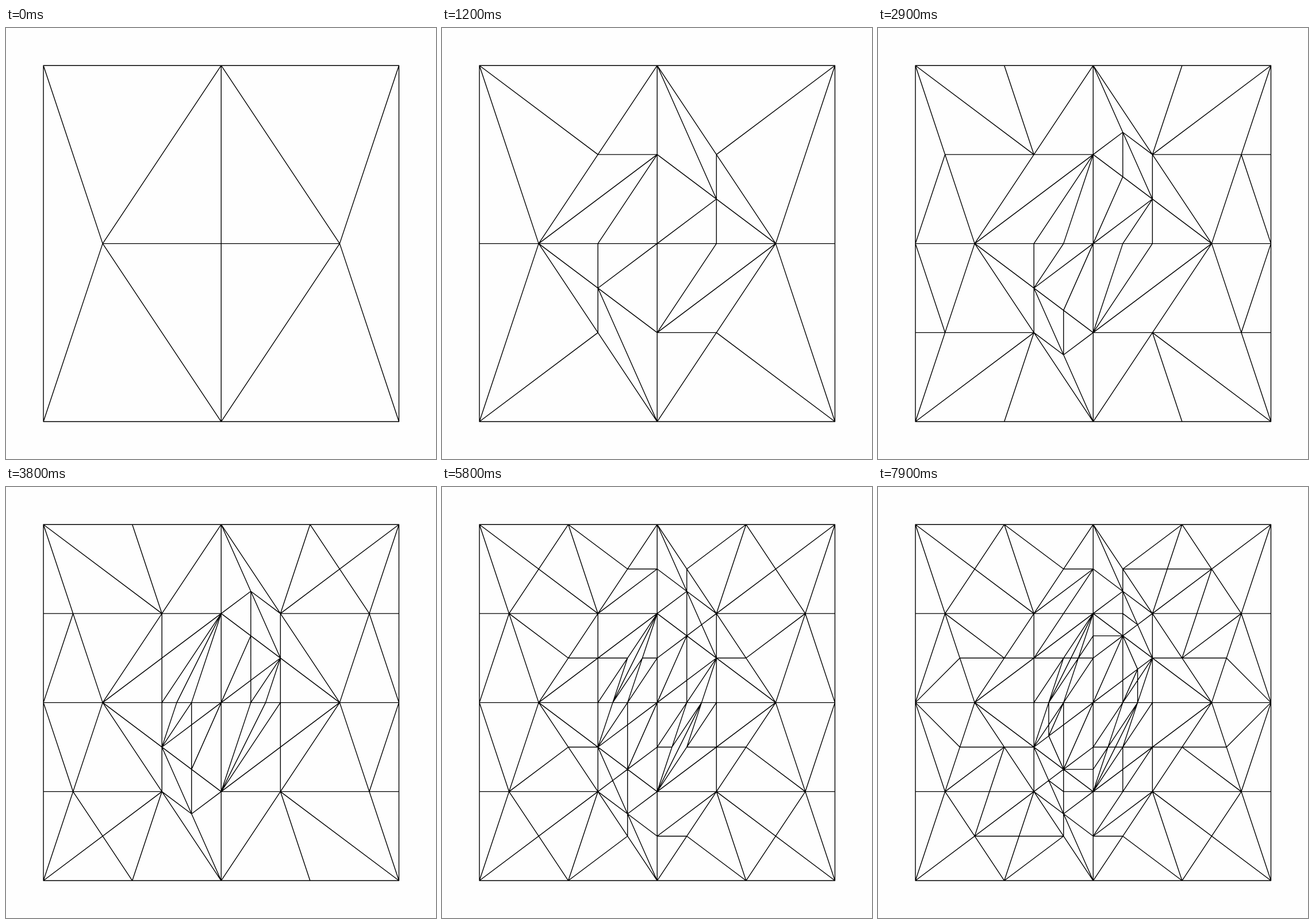
An HTML page with a canvas for the animation above (8000 ms loop, 748x749 px).

```html
<!DOCTYPE html>
<html>
<head>
<meta charset="utf-8">
<style>
html, body { margin: 0; width: 100%; height: 100%; overflow: hidden; background: #fefefe; }
canvas { display: block; }
</style>
</head>
<body>
<canvas id="stage" width="748" height="749"></canvas>
<script>
const ctx = document.getElementById('stage').getContext('2d');
const STEP = 100, LOOP = 8000;

// The square is a 12 x 12 grid with half-turn symmetry.
const turn = ([x, y]) => [12 - x, 12 - y];
const half = [
  [[0, 0], [6, 0], [2, 6]],
  [[6, 0], [12, 0], [10, 6]],
  [[0, 0], [2, 6], [0, 12]],
  [[6, 0], [2, 6], [6, 6]],
  [[6, 0], [10, 6], [6, 6]]
];
let mesh = [...half, ...half.map(t => t.map(turn))];

const mid = (a, b) => [(a[0] + b[0]) / 2, (a[1] + b[1]) / 2];
const dist = (a, b) => Math.hypot(a[0] - b[0], a[1] - b[1]);
const sides = t => t.map((a, i) => [a, t[(i + 1) % 3], t[(i + 2) % 3]]);

const stages = [mesh.flatMap(sides)];

// Splits the edge with midpoint m and records the new segments as one stage.
function split(m) {
  const added = [];
  mesh = mesh.flatMap(t => {
    const side = sides(t).find(([a, b]) => dist(mid(a, b), m) === 0);
    if (!side) return [t];
    const [a, b, c] = side;
    added.push([c, m]);
    return [[a, m, c], [m, b, c]];
  });
  stages.push(added);
}

function splitPair(m) {
  split(turn(m));
  split(m);
}

// Midpoint of the longest edge in the upper half, favouring the right and the centre.
function longest() {
  let best = 0, point;
  for (const [a, b] of mesh.flatMap(sides)) {
    const m = mid(a, b), [x, y] = m;
    if (y > 6 || (y === 6 && x > 6)) continue;
    const score = dist(a, b) + (x > 6 ? 0.4 : 0) - 0.04 * dist(m, [6, 6]);
    if (score > best) [best, point] = [score, m];
  }
  return point;
}

// Each round refines a few chosen edges, then a number of longest ones.
const rounds = [
  { chosen: [[6, 3], [8, 4.5], [4, 6]], longest: 5 },
  { chosen: [[7, 2.25], [7, 3.75], [5, 6]], longest: 6 },
  { chosen: [[7, 5.25], [4.5, 6], [6, 1.5], [7.5, 3.375], [6, 4.5], [5.5, 4.5]], longest: 6 },
  { chosen: [[5.25, 4.5], [6, 3.75], [7.5, 4.875], [7.5, 5.25], [8.5, 1.5], [9.5, 3], [5, 3]], longest: 1 },
  { chosen: [[7, 3], [1.5, 4.5], [5, 3.75]], longest: 0 }
];
for (const round of rounds) {
  round.chosen.forEach(splitPair);
  for (let i = 0; i < round.longest; i++) splitPair(longest());
}

const px = ([x, y]) => [65.1 + x * 51.535, 65.2 + y * 51.57];

function draw(now) {
  const n = Math.floor(now % LOOP / STEP);
  ctx.fillStyle = '#fefefe';
  ctx.fillRect(0, 0, 748, 749);
  ctx.strokeStyle = '#000';
  ctx.lineWidth = 1.4;
  ctx.lineCap = 'round';
  ctx.beginPath();
  for (const [a, b] of stages.slice(0, n + 1).flat()) {
    ctx.moveTo(...px(a));
    ctx.lineTo(...px(b));
  }
  ctx.stroke();
}

const start = performance.now();
function tick() {
  draw(performance.now() - start);
  requestAnimationFrame(tick);
}
tick();
</script>
</body>
</html>
```
